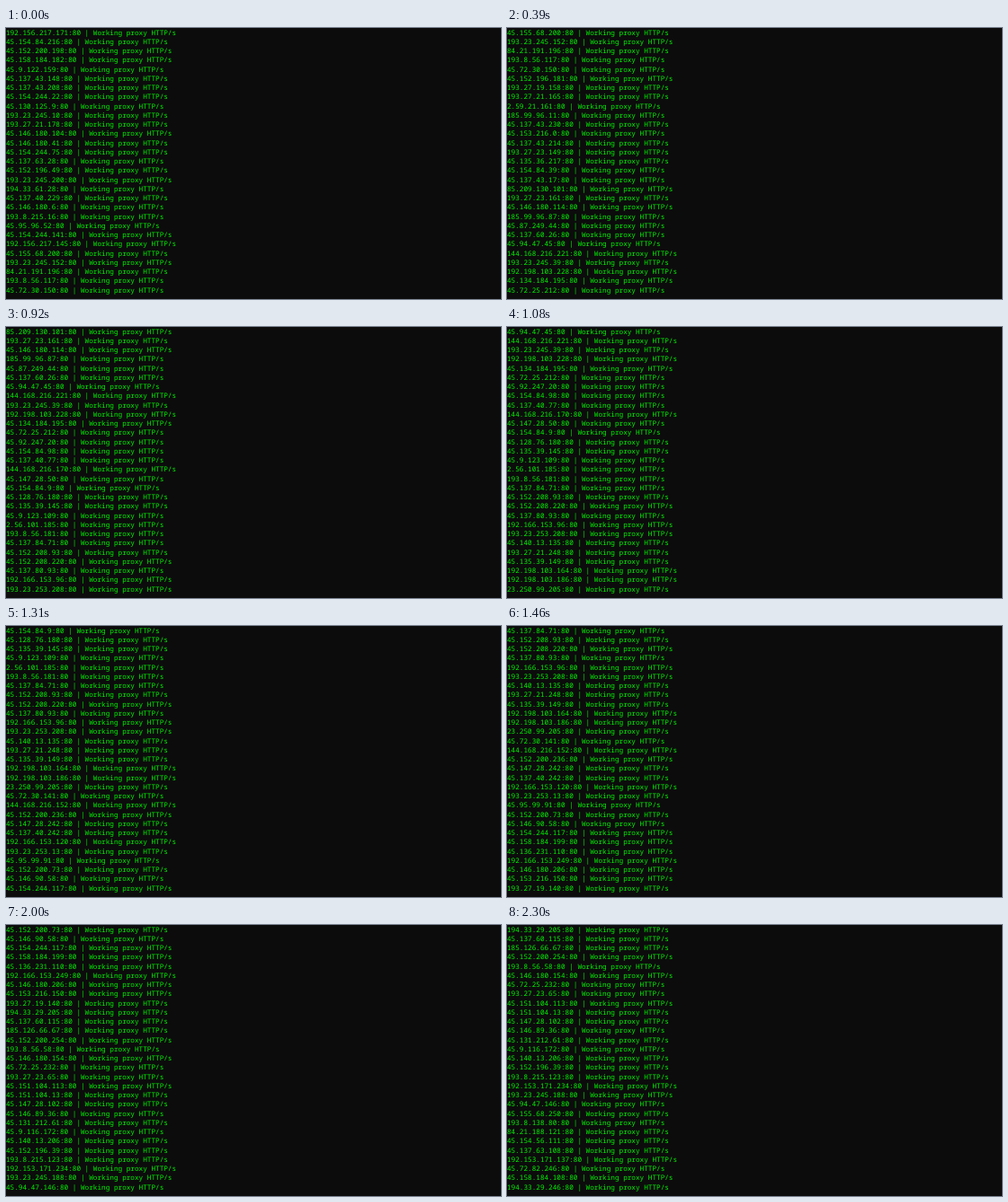
These frames come from a looping animation (550x302 px, 2380 ms). An HTML page:

```html
<!DOCTYPE html>
<html lang="en">
<head>
<meta charset="utf-8">
<title>Proxy checker</title>
<style>
  html, body {
    margin: 0;
    width: 100%;
    height: 100%;
    overflow: hidden;
    background: #0c0c0c;
  }
  #log {
    position: absolute;
    left: 0;
    top: 0;
    margin: 0;
    color: #00f800;
    font: 12px/16px "Noto Sans Mono", "DejaVu Sans Mono", monospace;
    text-rendering: geometricPrecision;
    font-variant-ligatures: none;
    transform: scale(.6405);
    transform-origin: 0 0;
  }
</style>
</head>
<body>
<pre id="log"></pre>
<script>
const hosts = `
192.156.217.171 45.154.84.216 45.152.200.198 45.158.184.182 45.9.122.159
45.137.43.148 45.137.43.208 45.154.244.22 45.130.125.9 193.23.245.10
193.27.21.178 45.146.180.104 45.146.180.41 45.154.244.75 45.137.63.28
45.152.196.49 193.23.245.200 194.33.61.28 45.137.40.229 45.146.180.6
193.8.215.16 45.95.96.52 45.154.244.141 192.156.217.145 45.155.68.200
193.23.245.152 84.21.191.196 193.8.56.117 45.72.30.150 45.152.196.181
193.27.19.158 193.27.21.165 2.59.21.161 185.99.96.11 45.137.43.230
45.153.216.0 45.137.43.214 193.27.23.149 45.135.36.217 45.154.84.39
45.137.43.17 85.209.130.101 193.27.23.161 45.146.180.114 185.99.96.87
45.87.249.44 45.137.60.26 45.94.47.45 144.168.216.221 193.23.245.39
192.198.103.228 45.134.184.195 45.72.25.212 45.92.247.20 45.154.84.98
45.137.40.77 144.168.216.170 45.147.28.50 45.154.84.9 45.128.76.180
45.135.39.145 45.9.123.109 2.56.101.185 193.8.56.181 45.137.84.71
45.152.208.93 45.152.208.220 45.137.80.93 192.166.153.96 193.23.253.208
45.140.13.135 193.27.21.248 45.135.39.149 192.198.103.164 192.198.103.186
23.250.99.205 45.72.30.141 144.168.216.152 45.152.200.236 45.147.28.242
45.137.40.242 192.166.153.120 193.23.253.13 45.95.99.91 45.152.200.73
45.146.90.58 45.154.244.117 45.158.184.199 45.136.231.110 192.166.153.249
45.146.180.206 45.153.216.150 193.27.19.140 194.33.29.205 45.137.60.115
185.126.66.67 45.152.200.254 193.8.56.58 45.146.180.154 45.72.25.232
193.27.23.65 45.151.104.113 45.151.104.13 45.147.28.102 45.146.89.36
45.131.212.61 45.9.116.172 45.140.13.206 45.152.196.39 193.8.215.123
192.153.171.234 193.23.245.188 45.94.47.146 45.155.68.250 193.8.138.80
84.21.188.121 45.154.56.111 45.137.63.108 192.153.171.137 45.72.82.246
45.158.184.108 194.33.29.246`.trim().split(/\s+/);

const lines = hosts.map(host => `${host}:80 | Working proxy HTTP/s`);
const LOOP = 2380, ROWS = 29, STEPS = 31;

// [step, first visible line]; the scroll runs evenly between these
const keys = [[0, 0], [5, 24], [9, 32], [14, 47], [17, 58], [22, 74], [30, 93]];

// Ticks fall every 76.67 ms, rounded up to 10 ms
const tickTime = step => Math.ceil(step * 23 / 3) * 10;

function topLine(step) {
  const i = Math.max(1, keys.findIndex(([s]) => s >= step));
  const [s0, l0] = keys[i - 1], [s1, l1] = keys[i];
  return Math.round(l0 + (l1 - l0) * (step - s0) / (s1 - s0));
}

const log = document.getElementById('log');
let shown = -1;

function draw(ms) {
  const t = ms % LOOP;
  let step = 0;
  while (step < STEPS - 1 && tickTime(step + 1) <= t) step++;
  if (step === shown) return;
  shown = step;
  const top = topLine(step);
  log.textContent = lines.slice(top, top + ROWS).join('\n');
}

const start = performance.now();
function loop() {
  draw(performance.now() - start);
  requestAnimationFrame(loop);
}
loop();
</script>
</body>
</html>
```
